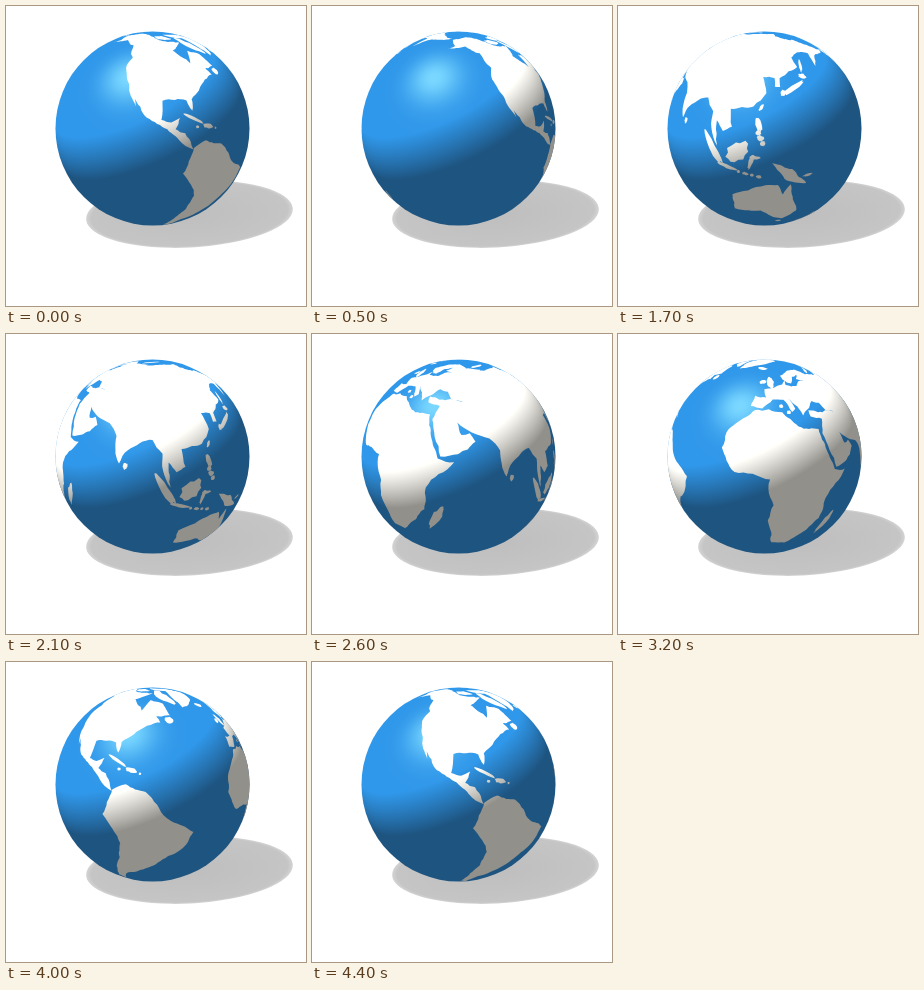
Write an HTML page with a canvas that moves like this. It is 300x300 px and loops after 4.5 s.

```html
<!DOCTYPE html>
<html lang="en">
<head>
<meta charset="utf-8">
<title>Turning globe</title>
<style>
html, body { margin: 0; height: 100%; overflow: hidden; background: #fff; }
canvas { display: block; width: 100vmin; height: 100vmin; }
</style>
</head>
<body>
<canvas id="stage" width="300" height="300"></canvas>
<script>
const SIZE = 300, CX = 146.5, CY = 122.5, R = 97;
const EYE = 4;                       // camera distance in globe radii
const ZOOM = Math.sqrt(EYE * EYE - 1);
const STEPS = 45, STEP_MS = 100, START_LON = -99.5;
const RAD = Math.PI / 180, TURN = 2 * Math.PI;
const TILT = 14.5 * RAD, ROLL = 10.5 * RAD;
const LIGHT = [-.41, -.85, .34], SHINE = [-.25, -.52, .816];
const ctx = document.getElementById('stage').getContext('2d');
const lands = [];

let seed = 7;
function random() {
  seed = seed * 16807 % 2147483647;
  return seed / 2147483647;
}

// Breaks an edge into a slightly ragged coast by shifting midpoints sideways.
function coast(a, b, out) {
  const dx = b[0] - a[0], dy = b[1] - a[1];
  if (Math.hypot(dx, dy) < 2.5) return out.push(a);
  const shift = (random() - .5) * .16;
  const mid = [a[0] + dx / 2 - dy * shift, a[1] + dy / 2 + dx * shift];
  coast(a, mid, out);
  coast(mid, b, out);
}

// Key points as lon, lat pairs.
function land(...keys) {
  const corners = [], outline = [];
  for (let i = 0; i < keys.length; i += 2) corners.push([keys[i], keys[i + 1]]);
  corners.forEach((p, i) => coast(p, corners[(i + 1) % corners.length], outline));
  lands.push(outline.map(p => p.map(deg => deg * RAD)));
}

// Ragged ellipse; sizes in degrees of arc, angle counted from east to north.
function isle(lon, lat, length, width, angle = 0) {
  const c = Math.cos(angle * RAD), s = Math.sin(angle * RAD);
  const outline = [];
  for (let a = 0; a < TURN; a += TURN / 16) {
    const k = .42 + .2 * random();
    const u = k * length * Math.cos(a), v = k * width * Math.sin(a);
    outline.push([(lon + (u * c - v * s) / Math.cos(lat * RAD)) * RAD, (lat + u * s + v * c) * RAD]);
  }
  lands.push(outline);
}

// Small islands evenly spaced from one place to another.
function chain(lon1, lat1, lon2, lat2, count, size) {
  for (let i = 0; i < count; i++) {
    const k = i / (count - 1);
    isle(lon1 + (lon2 - lon1) * k, lat1 + (lat2 - lat1) * k, size * (.8 + random()), size);
  }
}

// North America
land(-167,65, -156,71, -128,70, -96,68, -84,69, -94,59, -82,54, -79,51.5, -78,61, -64,60, -56,52,
  -66,49.5, -62,46, -70,42.5, -76,36, -81,31, -80.5,25.5, -84,30, -97,28, -96,19, -91,18.7,
  -87,21.3, -88.5,15.8, -83.5,14.5, -79.5,9.3, -78,7.3, -86,11, -95,16, -105.5,20.5, -113.5,31,
  -109.8,23, -117,32.5, -124,41, -124,48, -133,57, -148,60.5, -163,55, -158,59);
isle(-71, 68, 17, 6, -45);
isle(-110, 71, 8, 5);
isle(-82, 79, 14, 6, 30);
isle(-56, 48.8, 4, 4);
isle(-79.5, 21.8, 10, 1.4, -18);
isle(-71, 18.9, 5.5, 2);
chain(-77.3, 18.1, -66.4, 18.2, 2, 1.2);
// South America
land(-78,8, -72,12, -62,10.5, -50,0, -35.2,-6, -39,-17, -48.5,-27, -58,-37, -65,-42, -68,-50,
  -68,-55, -74,-51, -73,-38, -70.3,-18.3, -81,-5);
// Greenland, Iceland, British Isles
land(-72,78, -40,83, -18,80, -24,70, -43.5,60, -53,67);
isle(-18.5, 65, 5, 3);
isle(-2.3, 54, 9, 3.4, 110);
isle(-8, 53.3, 3.4, 2.6, 60);
// Europe
land(-9,37, -9,43.2, -1.5,43.5, -4.5,48.3, 8,54, 10,57.5, 11,54, 21,55, 24,59, 30,60, 22,60.5,
  25,65, 18,62, 16,56, 12.5,56, 8,58, 5,61, 14,68, 26,71, 41,67, 60,69, 60,42, 41,41.5, 37,45.5,
  31,46, 28,42, 26,40.5, 23,37, 19.5,41.5, 13,45.3, 18,40, 16,38, 10,44, 3,43, -2,37);
chain(14, 37.5, 9, 40, 2, 2);
// Asia
land(55,68, 80,73, 104,77.5, 113,73.5, 140,72, 190,66, 178,62, 163,59, 157,51, 156,60, 142,59,
  136,54.5, 140,48.5, 128,40, 129,35.3, 126,35, 125,39.5, 118,39, 122,31, 117,23.5, 106,20,
  109,12, 105,9, 100.5,13, 103.5,1.5, 98.5,9, 97,16.5, 91,22, 80.3,15, 77.5,8, 72.7,20, 66.5,25,
  57,26.5, 48.5,30, 52,24.5, 56,26, 59.5,22.5, 52,15.5, 44,12.8, 39,21, 34.8,29, 36,36.5,
  28,37, 27,40.3, 41,41.5, 55,42);
isle(80.7, 7.5, 3.2, 2, 90);
isle(101, 0, 17, 3.6, -48);
isle(110, -7.3, 9.5, 1.8, -7);
chain(116, -8.5, 126, -9, 4, 1.6);
isle(114, 1, 12, 8, 50);
isle(121, -2, 8, 1.8, 80);
isle(122.5, .2, 5, 1.4, 10);
isle(121.3, 16, 6.5, 2.6, -65);
chain(122, 12, 125, 7.5, 3, 2.4);
isle(121, 23.7, 3.4, 1.3, 70);
isle(142.8, 50, 8, 1.4, 90);
isle(143, 43.3, 4, 2.8);
isle(137, 36, 13, 2.4, 42);
isle(131, 32.6, 3, 2, 90);
isle(57, 73.5, 9, 2, 55);
// Africa
land(-5.8,35.5, 10,37, 20,31, 32.5,31, 37,21, 43,11.7, 51,11.5, 40,-3, 40.5,-15, 35,-24, 27,-34,
  18.5,-34, 12,-17, 13,-8, 9,0, 9,4.5, -8,4.5, -17,14, -17,21.5, -9.5,31);
isle(46.8, -19, 14, 4.2, 72);
// Oceania
land(114,-23, 115.5,-34, 124,-33, 131,-31.5, 139,-36, 147,-38.5, 153,-30, 146,-19, 142.4,-11,
  140,-17.5, 136,-12, 130,-13, 122,-18);
land(131,-1, 141,-2.7, 150.5,-10, 138.5,-8.3, 134,-4);
isle(150, -5.3, 5, 1.3, 20);
isle(146.7, -42, 3, 2.6);
isle(175.7, -39, 6, 2.4, 120);
isle(170.5, -43.8, 8, 2.2, 45);

const dot = (a, b) => a[0] * b[0] + a[1] * b[1] + a[2] * b[2];

// Paints a lit ball as a fill style; tone(diffuse, shine) gives red, green, blue.
function litPattern(tone) {
  const image = ctx.createImageData(SIZE, SIZE);
  for (let y = 0; y < SIZE; y++) {
    for (let x = 0; x < SIZE; x++) {
      const u = (x + .5 - CX) / R, v = (y + .5 - CY) / R;
      const normal = [u, v, Math.sqrt(Math.max(0, 1 - u * u - v * v))];
      const diffuse = Math.min(.45, Math.max(0, dot(normal, LIGHT)));
      const shine = Math.max(0, dot(normal, SHINE)) ** 25;
      image.data.set([...tone(diffuse, shine), 255], 4 * (y * SIZE + x));
    }
  }
  const layer = document.createElement('canvas');
  layer.width = layer.height = SIZE;
  layer.getContext('2d').putImageData(image, 0, 0);
  return ctx.createPattern(layer, 'no-repeat');
}
const sea = litPattern((d, s) => [30 + 40 * d + 75 * s, 84 + 150 * d + 65 * s, 128 + 235 * d + 22 * s]);
const soil = litPattern(d => [145 + 290 * d, 144 + 288 * d, 139 + 288 * d]);

function project([lon, lat], centre) {
  const d = lon - centre, c = Math.cos(lat), s = Math.sin(lat);
  const x = c * Math.sin(d), f = c * Math.cos(d);
  const y = Math.cos(TILT) * s - Math.sin(TILT) * f;
  const z = Math.sin(TILT) * s + Math.cos(TILT) * f;
  const front = z > 1 / EYE;
  // Hidden points slide out to the rim.
  const k = R * (front ? ZOOM / (EYE - z) : 1 / (Math.hypot(x, y) || 1));
  const u = x * Math.cos(ROLL) + y * Math.sin(ROLL);
  const v = y * Math.cos(ROLL) - x * Math.sin(ROLL);
  return { x: CX + k * u, y: CY - k * v, front };
}

function drawShadow() {
  ctx.save();
  ctx.translate(183.5, 208);
  ctx.rotate(-3 * RAD);
  ctx.scale(103.5, 33.5);
  const g = ctx.createRadialGradient(0, 0, 0, 0, 0, 1);
  g.addColorStop(0, '#bebebe');
  g.addColorStop(.95, '#c5c5c5');
  g.addColorStop(1, '#d4d4d4');
  ctx.fillStyle = g;
  ctx.beginPath();
  ctx.arc(0, 0, 1, 0, TURN);
  ctx.fill();
  ctx.restore();
}

function draw(now) {
  const step = Math.floor(now / STEP_MS) % STEPS;
  const centre = (START_LON - step * 360 / STEPS) * RAD;
  ctx.fillStyle = '#fff';
  ctx.fillRect(0, 0, SIZE, SIZE);
  drawShadow();
  ctx.fillStyle = sea;
  ctx.beginPath();
  ctx.arc(CX, CY, R, 0, TURN);
  ctx.fill();
  ctx.fillStyle = soil;
  for (const outline of lands) {
    const shape = outline.map(p => project(p, centre));
    if (!shape.some(p => p.front)) continue;
    ctx.beginPath();
    for (const p of shape) ctx.lineTo(p.x, p.y);
    ctx.fill();
  }
  requestAnimationFrame(() => draw(performance.now()));
}
draw(performance.now());
</script>
</body>
</html>
```
